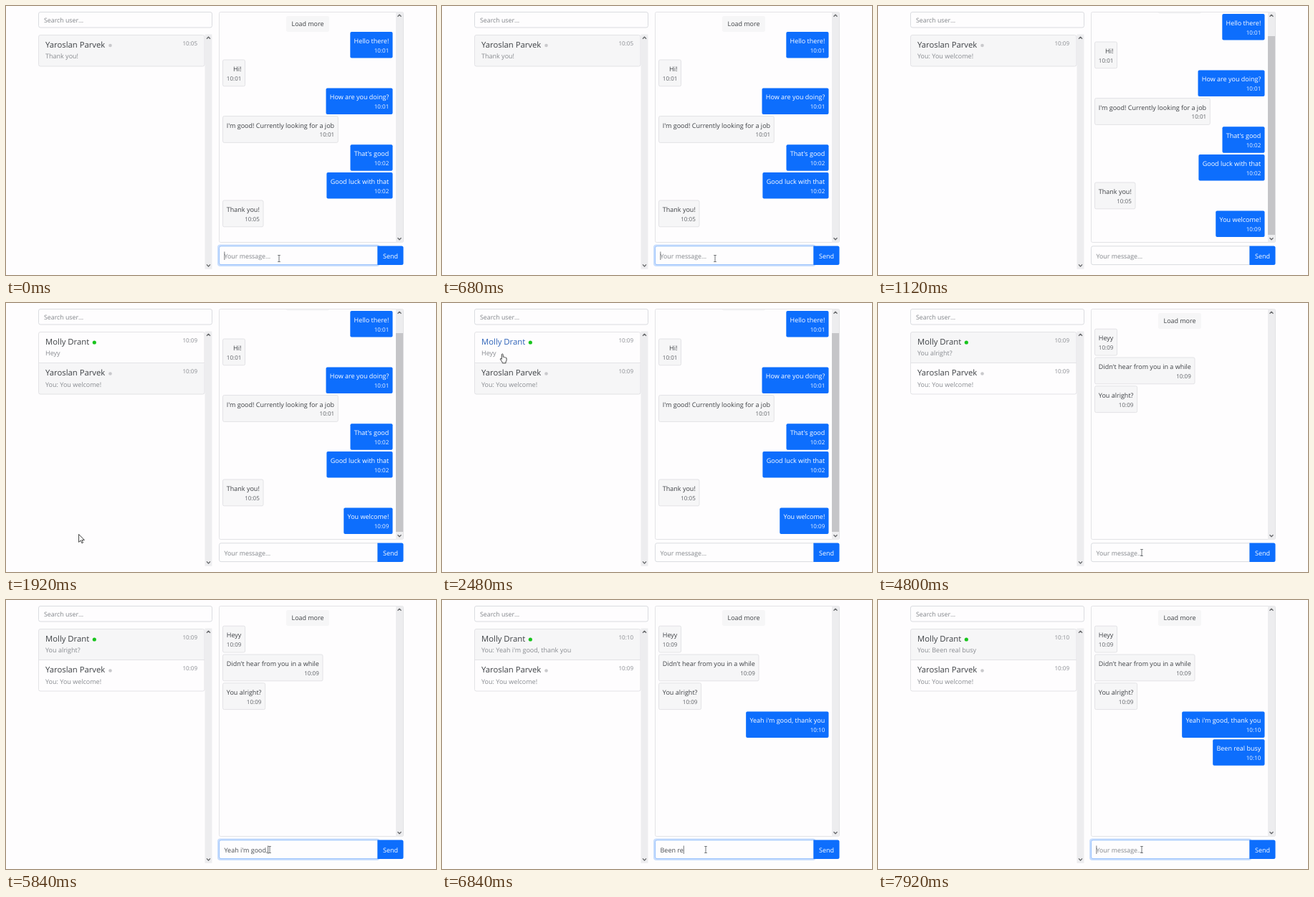
Animation of 600 by 375 pixels, one loop 8000 ms. Source, as an HTML page with a canvas:

```html
<!DOCTYPE html>
<html lang="en">
<head>
<meta charset="utf-8">
<title>Chat</title>
<style>
html, body { margin: 0; height: 100%; overflow: hidden; background: #fefdfe; }
canvas { display: block; width: 100vw; height: 100vh; }
</style>
</head>
<body>
<canvas id="stage" width="600" height="375"></canvas>
<script>
const ctx = document.getElementById('stage').getContext('2d');
const LOOP = 8000;
const PAPER = '#fefdfe', GREY = '#f6f6f7', LINE = '#e3e3e6', FIELD = '#dadce0', BLUE = '#0d6efd';
const INK = '#3e4145', MUTED = '#888b90';

// Moments when something happens, in ms
const AT = { welcome: 720, blur: 1000, newChat: 1480, open: 2600, second: 3440,
             third: 4720, focus: 4920, reply: 6340, busy: 7380 };

// Messages: [arrival, mine, text, time]
const firstChat = [
  [0, 1, 'Hello there!', '10:01'],
  [0, 0, 'Hi!', '10:01'],
  [0, 1, 'How are you doing?', '10:01'],
  [0, 0, "I'm good! Currently looking for a job", '10:01'],
  [0, 1, "That's good", '10:02'],
  [0, 1, 'Good luck with that', '10:02'],
  [0, 0, 'Thank you!', '10:05'],
  [AT.welcome, 1, 'You welcome!', '10:09']
];
const secondChat = [
  [AT.newChat, 0, 'Heyy', '10:09'],
  [AT.second, 0, "Didn't hear from you in a while", '10:09'],
  [AT.third, 0, 'You alright?', '10:09'],
  [AT.reply, 1, "Yeah i'm good, thank you", '10:10'],
  [AT.busy, 1, 'Been real busy', '10:10']
];

// Typing: [start, end, cleared, text, letters already there]
const typing = [
  [40, 620, 680, 'You welcome!', 0],
  [5120, 5800, 5920, "Yeah i'm good,", 0],
  [5920, 6270, 6320, "Yeah i'm good, thank you", 14],
  [6420, 7220, 7320, 'Been real busy', 0]
];

// Pointer: [time, x, y]
const pointerPath = [
  [0, 381, 352], [840, 381, 352], [1080, 385, 385], [1200, 130, 390], [1760, 130, 390],
  [2160, 50, 200], [2440, 85, 77], [2680, 85, 77], [3000, -14, 110],
  [3880, -14, 110], [4040, 368, 348], [LOOP, 368, 348]
];

function pointerAt(t) {
  const i = pointerPath.findIndex(p => p[0] > t);
  const [t0, x0, y0] = pointerPath[i - 1], [t1, x1, y1] = pointerPath[i];
  const u = (t - t0) / (t1 - t0), k = u * u * (3 - 2 * u);
  return [x0 + (x1 - x0) * k, y0 + (y1 - y0) * k];
}

function typedAt(t) {
  const entry = typing.find(e => t >= e[0] && t < e[2]);
  if (!entry) return '';
  const [start, end, , text, from] = entry;
  return text.slice(0, from + (text.length - from) * Math.min(1, (t - start) / (end - start)));
}

function setFont(size) {
  ctx.font = `${size}px "Open Sans", "Noto Sans", sans-serif`;
}

function write(text, x, y, color, size = 9, align = 'left') {
  setFont(size);
  ctx.fillStyle = color;
  ctx.textAlign = align;
  ctx.fillText(text, x, y);
}

function box(x, y, w, h, fill, stroke, radius = 2.5) {
  ctx.beginPath();
  ctx.roundRect(x, y, w, h, radius);
  if (fill) { ctx.fillStyle = fill; ctx.fill(); }
  if (stroke) { ctx.strokeStyle = stroke; ctx.lineWidth = 1; ctx.stroke(); }
}

function dot(x, y, r, color) {
  ctx.beginPath();
  ctx.arc(x, y, r, 0, 7);
  ctx.fillStyle = color;
  ctx.fill();
}

function chevron(x, y, dir) {
  ctx.beginPath();
  ctx.moveTo(x - 2.5, y + dir * 1.3);
  ctx.lineTo(x, y - dir * 1.3);
  ctx.lineTo(x + 2.5, y + dir * 1.3);
  ctx.strokeStyle = '#66686b';
  ctx.lineWidth = 1.3;
  ctx.stroke();
}

function scrollbar(x, top, bottom, thumb) {
  box(x, top, 10, bottom - top, '#ededef', null, 0);
  if (thumb) box(x, 42, 10, 277, '#c5c5c8', null, 0);
  chevron(x + 5, top + 5, 1);
  chevron(x + 5, bottom - 5, -1);
}

function contact(y, name, online, dotX, preview, time, active, [px, py]) {
  const hover = px > 45 && px < 277 && py > y && py < y + 43.5;
  if (active) box(45.5, y, 231.5, 43.5, GREY, null);
  write(name, 55, y + 17.4, hover ? '#2d62b8' : INK, 11.3);
  dot(dotX, y + 14.5, online ? 2.6 : 2.3, online ? '#17c41c' : '#c9c9cc');
  write(time, 267, y + 14.4, MUTED, 8.05, 'right');
  write(preview, 55, y + 32.5, MUTED);
}

function contacts(t, pointer) {
  box(45.5, 8.5, 242, 21.5, PAPER, FIELD);
  write('Search user...', 53, 23, '#808489', 8.8);
  scrollbar(277.5, 39.5, 366.7);
  const two = t >= AT.newChat, opened = t >= AT.open;
  const sent = t >= AT.welcome;
  contact(two ? 84 : 40.5, 'Yaroslan Parvek', false, 145.5,
    sent ? 'You: You welcome!' : 'Thank you!', sent ? '10:09' : '10:05', !opened, pointer);
  if (two) {
    const [, mine, text, time] = secondChat.filter(m => t >= m[0]).pop();
    contact(40.5, 'Molly Drant', true, 123.3, (mine ? 'You: ' : '') + text, time, opened, pointer);
    box(45.5, 83.5, 231.5, 0.01, null, LINE, 0);
  }
  box(45.5, 40.5, 231.5, two ? 86.5 : 43.5, null, LINE);
}

function bubble(y, mine, text, time) {
  setFont(9);
  const wide = ctx.measureText(text).width;
  setFont(8.05);
  const w = Math.max(wide, ctx.measureText(time).width) + 10.5;
  const x = mine ? 539.5 - w : 302.5, right = x + w - 5.2;
  if (mine) box(x, y, w, 36.5, BLUE, null, 2);
  else box(x, y + 0.2, w, 36.8, GREY, LINE, 2);
  const drop = mine ? 0 : 0.5;
  write(text, right, y + 15.7 + drop, mine ? '#fff' : INK, 9, 'right');
  write(time, right, y + 28.5 + drop, mine ? '#eef4ff' : '#5d6065', 8.05, 'right');
}

function chat(t) {
  const scrolled = t >= AT.welcome && t < AT.open;
  const shift = scrolled ? -25 : 0;
  ctx.save();
  ctx.beginPath();
  ctx.rect(297, 8.5, 257, 321);
  ctx.clip();
  box(391, 14 + shift, 60, 22, GREY, null);
  write('Load more', 421, 28.3 + shift, INK, 8.95, 'center');
  let y = 36 + shift;
  for (const [arrival, mine, text, time] of t < AT.open ? firstChat : secondChat) {
    if (t < arrival) break;
    bubble(y, mine, text, time);
    y += mine ? 38.8 : 39.8;
  }
  ctx.restore();
  box(297.5, 8.5, 257, 321, null, LINE, 2);
  scrollbar(544, 8.5, 329.5, scrolled);
}

function composer(t) {
  const focused = t < AT.blur || t >= AT.focus;
  const text = typedAt(t);
  if (focused) box(295, 332.5, 226.5, 30.6, '#c9defd', null, 4);
  box(297.5, 334.8, 221.3, 25.8, PAPER, focused ? '#98c1fc' : FIELD, [2.5, 0, 0, 2.5]);
  box(518.4, 334.4, 36.1, 26.5, BLUE, null, [0, 2.5, 2.5, 0]);
  write('Send', 536.5, 352, '#fff', 9, 'center');
  write(text || 'Your message...', 304.5, 352, text ? '#494d52' : '#808489', text ? 9 : 8.85);
  if (focused) {
    const end = text ? ctx.measureText(text).width : 0;
    box(304.5 + end, 342.5, 0.8, 11.5, '#55585b', null, 0);
  }
}

function shape(x, y, points) {
  ctx.beginPath();
  for (let i = 0; i < points.length; i += 2) ctx.lineTo(x + points[i], y + points[i + 1]);
  ctx.closePath();
  ctx.fillStyle = '#fff';
  ctx.strokeStyle = '#333';
  ctx.lineWidth = 0.9;
  ctx.lineJoin = 'round';
  ctx.fill();
  ctx.stroke();
}

const ARROW = [0, 0, 0, 11, 2.6, 8.6, 4.4, 12.4, 6, 11.6, 4.3, 8, 7.8, 8];
const HAND = [-1.7, -5.4, -0.8, -6.2, 0.2, -5.4, 0.3, -1.7, 1.6, -1.9, 2.2, -1.2, 3.4, -1.3,
              4, -0.6, 5, -0.3, 5.1, 3, 4, 5, 4, 6.8, -0.7, 6.8, -1, 5.2, -3.9, 1.2, -3, 0.3, -1.7, 1.4];

function pointer(t, [x, y]) {
  if (x > 297 && x < 519 && y > 334 && y < 361) {
    ctx.beginPath();
    for (const s of [-1, 1]) {
      ctx.moveTo(x - 1.8, y + s * 4.5);
      ctx.lineTo(x + 1.8, y + s * 4.5);
    }
    ctx.moveTo(x, y - 4.5);
    ctx.lineTo(x, y + 4.5);
    ctx.strokeStyle = '#66686b';
    ctx.lineWidth = 0.9;
    ctx.stroke();
  } else {
    const onList = x > 45 && x < 277 && y > 40 && y < (t >= AT.newChat ? 127 : 84);
    shape(x, y, onList ? HAND : ARROW);
  }
}

function draw(now) {
  const t = now % LOOP, at = pointerAt(t);
  ctx.textRendering = 'geometricPrecision';
  ctx.fillStyle = PAPER;
  ctx.fillRect(0, 0, 600, 375);
  contacts(t, at);
  chat(t);
  composer(t);
  pointer(t, at);
  requestAnimationFrame(() => draw(performance.now()));
}
draw(performance.now());
</script>
</body>
</html>
```
